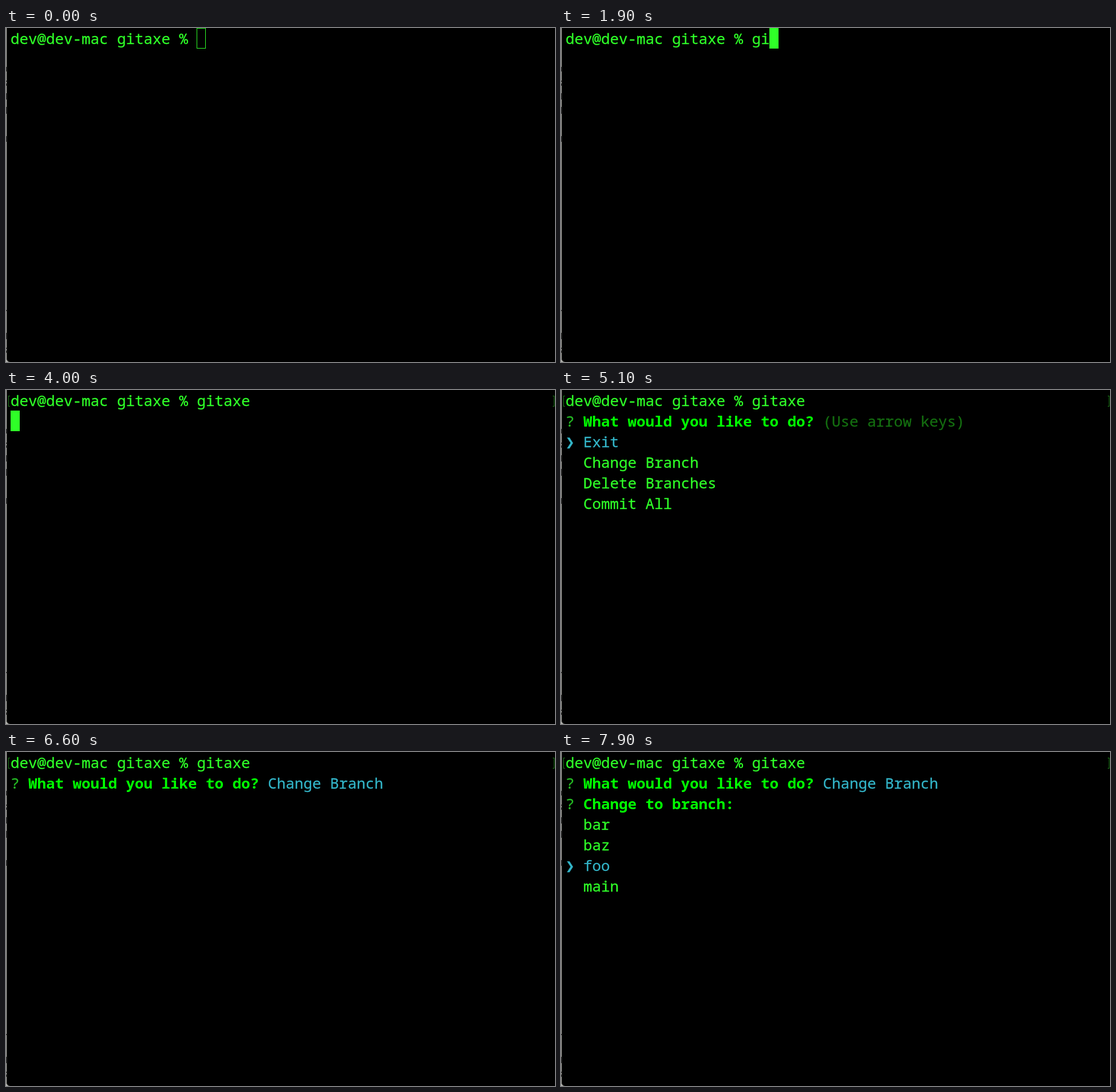
These frames come from a looping animation (959x584 px, 8000 ms). An HTML page:

```html
<!DOCTYPE html>
<html lang="en">
<head>
<meta charset="utf-8">
<title>Terminal menu</title>
<style>
  html, body { margin: 0; width: 100%; height: 100%; overflow: hidden; background: #000; }
  #stage { position: relative; width: 959px; height: 584px; overflow: hidden; background: #b4b5b0; }
  #window { position: absolute; inset: 0 0 0 1px; background: #000; border-bottom-left-radius: 6px; box-shadow: inset 1px 0 #2a2a28; }
  #edge i { position: absolute; left: 0; width: 1px; background: #333; }
  #screen {
    position: absolute; left: 8px; top: 0;
    font: 25.83px/36px "Noto Sans Mono", "DejaVu Sans Mono", monospace;
    color: #2fff28; white-space: pre; font-variant-ligatures: none;
    -webkit-text-stroke: 0.3px;
  }
  #screen div { height: 36px; }
  b { font-weight: 700; color: #0f0; -webkit-text-stroke: 0; }
  .mark { color: #25bc24; }
  .hint { color: #146e10; }
  .pick { color: #33b5c8; }
  .cursor { display: inline-block; width: 15.5px; height: 36px; vertical-align: top; box-sizing: border-box; background: #2fff28; }
  .idle { width: 16px; margin-left: -0.5px; background: none; border: 1px solid #2fff28; }
  .bracket { position: absolute; top: 10px; width: 3px; height: 19px; box-sizing: border-box; border: 1px solid #1c7a18; }
  .open { left: 4px; border-right: 0; }
  .close { left: 955px; border-left: 0; }
</style>
</head>
<body>
<div id="stage">
  <div id="window"></div>
  <div id="edge"></div>
  <div id="screen"></div>
  <div id="brackets"><div class="bracket open"></div><div class="bracket close"></div></div>
</div>
<script>
const LOOP = 8000;
const COMMAND = "gitaxe";
const KEY_TIMES = [1400, 1800, 2300, 2800, 3200, 3500];
const FOCUS = 1000, ENTER = 3800;
const MENU = 4500, MENU_DOWN = 5600, ANSWER = 6500;
const BRANCHES = 7300, BRANCH_DOWN = [7600, 7800];

const screen = document.getElementById("screen");
const brackets = document.getElementById("brackets");

// Slivers of the window behind, as [top, height]
document.getElementById("edge").innerHTML =
  [[68, 8], [92, 2], [97, 4], [114, 11], [138, 12], [189, 10], [493, 2], [533, 11], [559, 2], [564, 4]]
    .map(([top, height]) => `<i style="top:${top}px;height:${height}px"></i>`).join("");

const span = (style, text = "") => `<span class="${style}">${text}</span>`;
const question = (text, rest = "") => `${span("mark", "?")} <b>${text}</b> ${rest}`;

function list(title, items, selected, fresh) {
  const rows = items.map((item, i) => i === selected ? span("pick", "❯ " + item) : "  " + item);
  return [question(title, fresh ? span("hint", "(Use arrow keys)") : ""), ...rows];
}

function linesAt(t) {
  const typed = COMMAND.slice(0, KEY_TIMES.filter(k => t >= k).length);
  const prompt = "dev@dev-mac gitaxe % " + typed;
  const ask = "What would you like to do?";
  if (t < ENTER) return [prompt + span(t < FOCUS ? "cursor idle" : "cursor")];
  if (t < MENU) return [prompt, span("cursor")];
  if (t < ANSWER) {
    const moved = t >= MENU_DOWN;
    return [prompt, ...list(ask, ["Exit", "Change Branch", "Delete Branches", "Commit All"], +moved, !moved)];
  }
  const lines = [prompt, question(ask, span("pick", "Change Branch"))];
  if (t >= BRANCHES) {
    const selected = BRANCH_DOWN.filter(k => t >= k).length;
    lines.push(...list("Change to branch:", ["bar", "baz", "foo", "main"], selected, selected === 0));
  }
  return lines;
}

let shown = "";
function draw() {
  const t = performance.now() % LOOP;
  const html = linesAt(t).map(line => `<div>${line}</div>`).join("");
  if (html !== shown) screen.innerHTML = shown = html;
  brackets.hidden = t < ENTER;
  requestAnimationFrame(draw);
}
draw();
</script>
</body>
</html>
```
